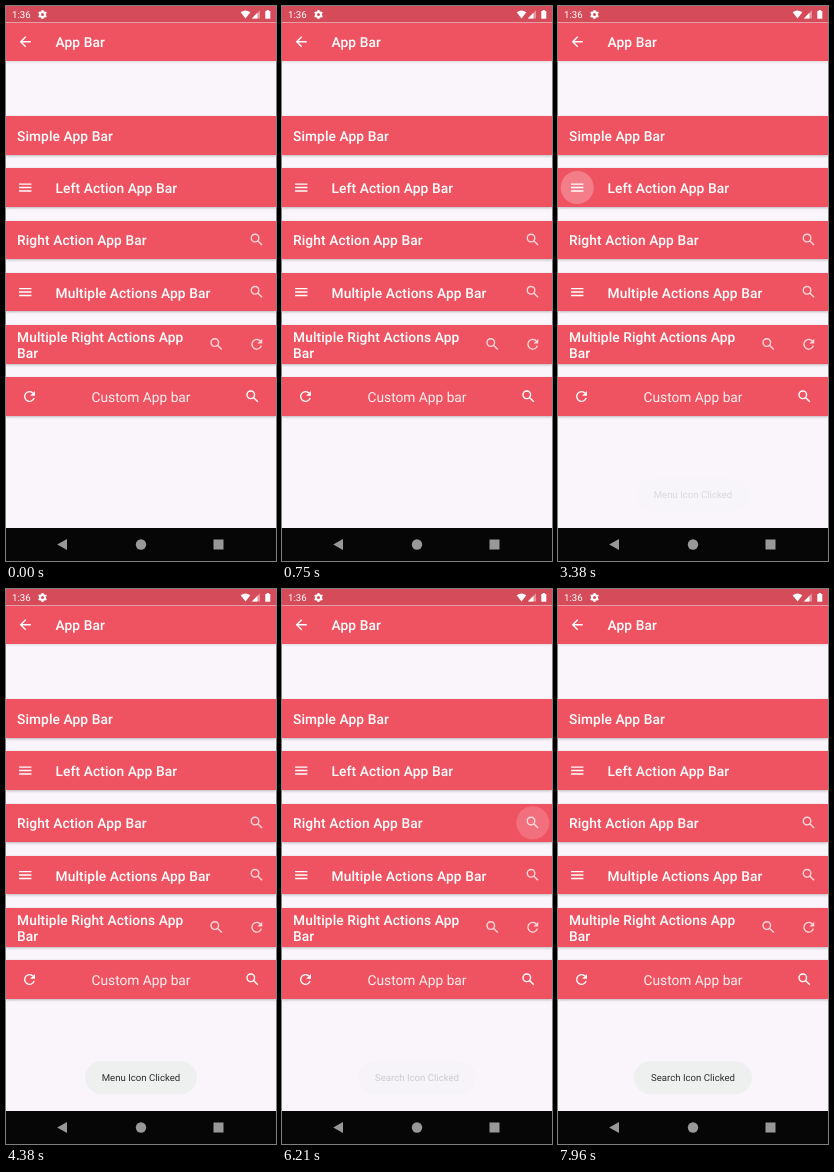
An HTML page with a canvas for the animation above (8000 ms loop, 270 by 555 pixels).

```html
<!DOCTYPE html>
<html lang="en">
<head>
<meta charset="utf-8">
<title>App Bar</title>
<style>
html, body { margin: 0; width: 100%; height: 100%; overflow: hidden; background: #f9f5fb; }
canvas { display: block; width: 270px; height: 555px; }
</style>
</head>
<body>
<canvas id="stage" width="270" height="555"></canvas>
<script>
const ctx = document.getElementById('stage').getContext('2d');
const LOOP = 8000;
const DP = 0.6875;
const BAR_H = 56 * DP;
const RED = '#ef5362';
const PALE = 'rgba(255,255,255,.78)';
const rowTop = i => 110 + i * 76 * DP;
const rowMid = i => rowTop(i) + BAR_H / 2;
const baseline = i => Math.round(rowMid(i) + 5.5);
const clamp = v => Math.max(0, Math.min(1, v));
const ramp = (t, from, to) => clamp((t - from) / (to - from));
const easeOut = v => 1 - (1 - v) ** 3;

function text(str, x, y, { size = 9.625, weight = 400, color = '#fff', align = 'left', spacing = 0 } = {}) {
  ctx.font = `${weight} ${size}px Roboto, sans-serif`;
  ctx.textRendering = 'geometricPrecision';
  ctx.letterSpacing = `${spacing}px`;
  ctx.fillStyle = color;
  ctx.textAlign = align;
  ctx.fillText(str, x, y);
}

function title(str, x, y) {
  text(str, x, y, { size: 20 * DP, weight: 500, spacing: 0.15 * DP });
}

function disc(x, y, r, color) {
  ctx.fillStyle = color;
  ctx.beginPath();
  ctx.arc(x, y, r, 0, Math.PI * 2);
  ctx.fill();
}

function polygon(color, ...points) {
  ctx.fillStyle = color;
  ctx.beginPath();
  points.forEach(([x, y]) => ctx.lineTo(x, y));
  ctx.closePath();
  ctx.fill();
}

// Icons live on a 24-unit grid.
const icons = {
  menu() {
    for (const y of [7, 12, 17]) { ctx.moveTo(3, y); ctx.lineTo(21, y); }
    ctx.stroke();
  },
  back() {
    ctx.moveTo(20, 12); ctx.lineTo(5.5, 12);
    ctx.moveTo(12.7, 4.7); ctx.lineTo(5.4, 12); ctx.lineTo(12.7, 19.3);
    ctx.stroke();
  },
  search() {
    ctx.arc(9.5, 9.5, 5.5, 0, Math.PI * 2);
    ctx.moveTo(13.8, 13.8); ctx.lineTo(19.7, 19.7);
    ctx.stroke();
  },
  refresh(color) {
    ctx.arc(12, 12, 7, 0.29, 5.5);
    ctx.stroke();
    polygon(color, [13, 11], [20, 11], [20, 4]);
  }
};

function icon(name, x, y, color = '#fff') {
  ctx.save();
  ctx.translate(x, y);
  ctx.scale(DP, DP);
  ctx.translate(-12, -12);
  ctx.strokeStyle = color;
  ctx.lineWidth = 2;
  ctx.beginPath();
  icons[name](color);
  ctx.restore();
}

function bar(y, shade) {
  const top = Math.round(y);
  ctx.save();
  ctx.shadowColor = `rgba(0,0,0,${shade})`;
  ctx.shadowBlur = 2.5;
  ctx.shadowOffsetY = 1;
  ctx.fillStyle = RED;
  ctx.fillRect(0, top, 270, Math.round(y + BAR_H) - top);
  ctx.restore();
}

function gear(x, y) {
  ctx.strokeStyle = '#fff';
  ctx.lineWidth = 2;
  ctx.beginPath();
  ctx.arc(x, y, 2.5, 0, Math.PI * 2);
  for (let i = 0; i < 6; i++) {
    const a = i * Math.PI / 3 + Math.PI / 6;
    ctx.moveTo(x + 3 * Math.cos(a), y + 3 * Math.sin(a));
    ctx.lineTo(x + 4.5 * Math.cos(a), y + 4.5 * Math.sin(a));
  }
  ctx.stroke();
}

function statusBar() {
  ctx.fillStyle = '#d54b5a';
  ctx.fillRect(0, 0, 270, 16.5);
  text('1:36', 6, 12);
  gear(36.5, 8.5);
  ctx.fillStyle = '#fff';
  ctx.beginPath();
  ctx.moveTo(239.5, 12.5);
  ctx.lineTo(234.7, 6.3);
  ctx.quadraticCurveTo(239.5, 2.6, 244.3, 6.3);
  ctx.fill();
  polygon('rgba(255,255,255,.4)', [245.8, 12.5], [254, 12.5], [254, 4.3]);
  polygon('#fff', [245.8, 12.5], [251.5, 12.5], [251.5, 6.8]);
  ctx.fillStyle = '#fff';
  ctx.fillRect(259.3, 5, 5, 7.7);
  ctx.fillRect(260.7, 4, 2.2, 1);
}

function navBar() {
  ctx.fillStyle = '#060606';
  ctx.fillRect(0, 522, 270, 33);
  const gray = '#989898';
  polygon(gray, [51.2, 538.5], [61, 533], [61, 544]);
  disc(135, 538.5, 5.2, gray);
  ctx.fillStyle = gray;
  ctx.fillRect(207.5, 533.5, 10, 10);
}

function ripple(t, x, y, strength, start, release, end) {
  if (t < start || t >= end) return;
  const grow = easeOut(ramp(t, start, start + 250));
  const alpha = strength * ramp(t, start - 30, start + 75) * (1 - ramp(t, release, end));
  disc(x, y, 16.5 * (0.35 + 0.65 * grow), `rgba(255,255,255,${alpha})`);
}

function toast(label, width, alpha) {
  if (alpha <= 0) return;
  ctx.save();
  ctx.globalAlpha = alpha;
  ctx.fillStyle = '#eef0ef';
  ctx.beginPath();
  ctx.roundRect(135 - width / 2, 472.2, width, 33, 16.5);
  ctx.fill();
  text(label, 135, 492.4, { color: '#2c2d2c', align: 'center' });
  ctx.restore();
}

function firstToastAlpha(t) {
  if (t < 3380) return 0;
  if (t < 3500) return 0.14;
  return (0.14 + 0.86 * ramp(t, 3460, 3720)) * (1 - ramp(t, 5250, 5530));
}

function secondToastAlpha(t) {
  return t < 6200 ? 0 : 0.2 + 0.8 * ramp(t, 6210, 6480);
}

function draw(t) {
  ctx.fillStyle = '#f9f5fb';
  ctx.fillRect(0, 0, 270, 555);

  bar(16.5, 0.12);
  statusBar();
  for (let i = 0; i < 6; i++) bar(rowTop(i), 0.26);

  const left = 28 * DP, right = 270 - left;
  ripple(t, left, rowMid(1), 0.25, 3080, 3500, 3720);
  ripple(t, right, rowMid(2), 0.17, 5750, 6240, 6480);

  icon('back', left, 35.75);
  title('App Bar', 49.5, 41);

  title('Simple App Bar', 11, baseline(0));

  icon('menu', left, rowMid(1));
  title('Left Action App Bar', 49.5, baseline(1));

  title('Right Action App Bar', 11, baseline(2));
  icon('search', right, rowMid(2), PALE);

  icon('menu', left, rowMid(3));
  title('Multiple Actions App Bar', 49.5, baseline(3));
  icon('search', right, rowMid(3), PALE);

  title('Multiple Right Actions App', 11, baseline(4) - 8);
  title('Bar', 11, baseline(4) + 8);
  icon('search', 210.5, rowMid(4), PALE);
  icon('refresh', right, rowMid(4), PALE);

  icon('refresh', 23.5, rowMid(5));
  text('Custom App bar', 135, baseline(5), { size: 20 * DP, color: 'rgba(255,255,255,.9)', align: 'center' });
  icon('search', 246.5, rowMid(5));

  toast('Menu Icon Clicked', 112, firstToastAlpha(t));
  toast('Search Icon Clicked', 118, secondToastAlpha(t));
  navBar();
}

const began = performance.now();
function tick() {
  draw((performance.now() - began) % LOOP);
  requestAnimationFrame(tick);
}
tick();
</script>
</body>
</html>
```
